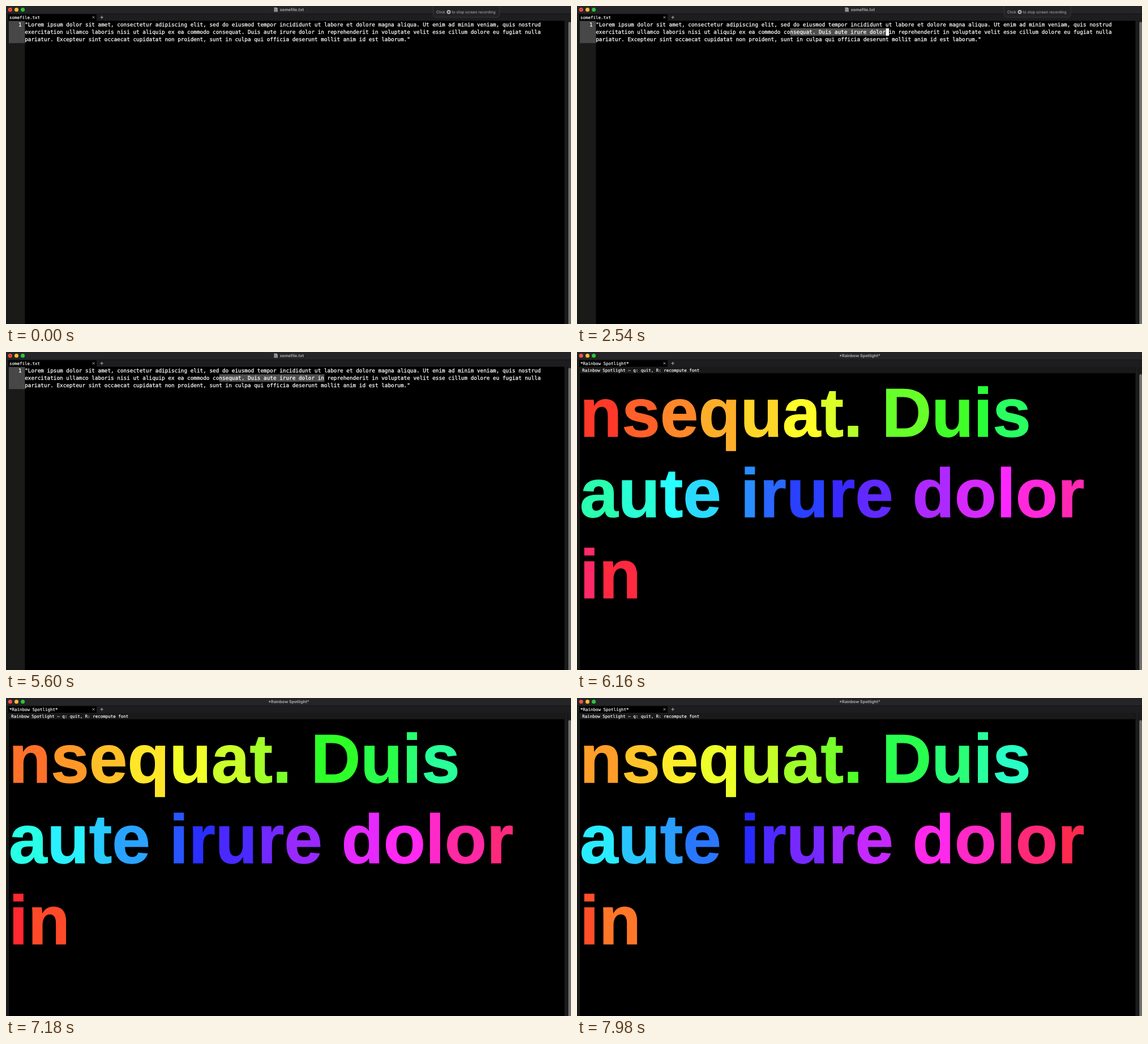
An HTML page for the animation above (8000 ms loop, 998 px wide and 561 px high).

```html
<!DOCTYPE html>
<html lang="en">
<head>
<meta charset="utf-8">
<title>Editor</title>
<style>
  html, body { margin: 0; width: 100%; height: 100%; overflow: hidden; background: #000; }
  svg { display: block; width: 100%; height: 100%; }
  text { text-rendering: geometricPrecision; white-space: pre; font-kerning: none; font-variant-ligatures: none; }
  .mono { font-family: "DejaVu Sans Mono", monospace; font-size: 9.35px; fill: #fff; stroke: #fff; stroke-width: .25px; }
  .small { font-size: 7.48px; stroke-width: .15px; }
  .title { font: 700 7.2px Inter, sans-serif; fill: #a9a9ab; text-anchor: middle; }
  .hint { font: 500 6.6px Inter, sans-serif; fill: #a2a2a4; }
  .big { font: 700 121.5px "Liberation Sans", Arial, sans-serif; stroke-width: 1.3px; }
</style>
</head>
<body>
<svg viewBox="0 0 998 561" preserveAspectRatio="none">
  <rect width="998" height="561"/>
  <rect width="998" height="14" fill="#252527"/>
  <rect y="14" width="998" height="12" fill="#1d1d20"/>
  <rect y="13.4" width="998" height="1" fill="#131315"/>
  <rect x="4" y="14.5" width="156" height="11.5"/>
  <rect y="26" width="5" height="535" fill="#19191a"/>
  <rect x="986.5" y="26" width="11.5" height="535" fill="#1c1c1d"/>
  <rect x="992" y="26" width="1" height="535" fill="#0f0f10"/>
  <rect id="thumb" x="993.2" width="4.8" height="560" rx="2.4" fill="#707071"/>
  <g id="lights">
    <circle cx="7.3" cy="6.6" r="3.5" fill="#fe4f48"/>
    <circle cx="18.5" cy="6.6" r="3.5" fill="#fdbd2f"/>
    <circle cx="29.6" cy="6.6" r="3.5" fill="#2ac73f"/>
  </g>
  <text id="title" class="title" y="9"></text>
  <text id="tab" class="mono small" x="6" y="22.7"></text>
  <path d="M152.7 18.2l3.6 3.6m0-3.6l-3.6 3.6M166.6 20h5.2M169.2 17.4v5.2" stroke="#c4c4c4" stroke-width=".9"/>

  <g id="editor">
    <circle cx="7.3" cy="6.6" r="1.1" fill="#7c1410"/>
    <path d="M473.4 2.4h4l2.6 2.6v5.2h-6.6z" fill="#8f8f91"/>
    <path d="M477.4 2.4v2.6h2.6z" fill="#c2c2c4"/>
    <rect x="5" y="26" width="28.4" height="535" fill="#1a1a19"/>
    <rect x="5" y="26.5" width="28.4" height="39" fill="#474747"/>
    <text class="mono" x="22" y="36.4">1</text>
    <rect id="selection" y="39.4" height="13" fill="#4e4e4e"/>
    <g id="lines"></g>
    <g id="cursor">
      <rect y="39.4" width="5.63" height="13" fill="#fff"/>
      <text id="under" class="mono" y="49.4" style="fill:#000;stroke:none"></text>
    </g>
    <g id="hint">
      <rect x="754.5" y="-6" width="117.5" height="26" rx="5" fill="#232325" stroke="#3c3c3e" stroke-width=".8"/>
      <text class="hint" x="760" y="13">Click</text>
      <circle cx="782" cy="10.6" r="3.5" fill="#b4b4b6"/>
      <circle cx="782" cy="10.6" r="1.4" fill="#29292b"/>
      <text class="hint" x="787.5" y="13">to stop screen recording</text>
    </g>
  </g>

  <g id="rainbow">
    <rect x="5" y="26" width="981.5" height="11.5" fill="#19191a"/>
    <text class="mono small" x="9.3" y="34.5">Rainbow Spotlight – q: quit, R: recompute font</text>
    <g id="words"></g>
  </g>
</svg>
<script>
const LOOP = 8000, COL = 5.63, LEFT = 33.2, MARK = 61;
const RAINBOW_AT = 5640;
const paragraph = [
  '"Lorem ipsum dolor sit amet, consectetur adipiscing elit, sed do eiusmod tempor incididunt ut labore et dolore magna aliqua. Ut enim ad minim veniam, quis nostrud',
  'exercitation ullamco laboris nisi ut aliquip ex ea commodo consequat. Duis aute irure dolor in reprehenderit in voluptate velit esse cillum dolore eu fugiat nulla',
  'pariatur. Excepteur sint occaecat cupidatat non proident, sunt in culpa qui officia deserunt mollit anim id est laborum."'
];
const spotlight = ['nsequat. Duis ', 'aute irure dolor ', 'in'];

// [time, cursor column, cursor visible]
const moves = [
  [0, MARK, false], [440, MARK, true], [860, 68, true], [1260, 74, true],
  [1680, 79, true], [2080, 85, true], [2400, 91, true], [2800, 94, true], [5600, 94, false]
];
// [time, scale, opacity]
const hintSteps = [[0, 1, 1], [3620, .8, .8], [3660, .57, .6], [3760, .5, 0]];

const $ = id => document.getElementById(id);
const at = (steps, t) => steps.findLast(s => s[0] <= t);
const show = (node, on) => node.setAttribute('visibility', on ? 'inherit' : 'hidden');

function addNode(parent, tag, attrs, content) {
  const node = document.createElementNS('http://www.w3.org/2000/svg', tag);
  for (const key in attrs) node.setAttribute(key, attrs[key]);
  if (content) node.textContent = content;
  return parent.appendChild(node);
}

paragraph.forEach((line, i) =>
  addNode($('lines'), 'text', { class: 'mono', x: LEFT, y: 36.4 + 13 * i }, line));

const letters = spotlight.flatMap((line, i) => {
  const row = addNode($('words'), 'text', { class: 'big', x: 5, y: 149.1 + 142.3 * i });
  return [...line].map(char => addNode(row, 'tspan', {}, char));
});

function drawEditor(t) {
  const [, col, visible] = at(moves, t);
  const x = LEFT + COL * col;
  $('selection').setAttribute('x', LEFT + COL * MARK);
  $('selection').setAttribute('width', COL * (col - MARK));
  show($('cursor'), visible);
  $('cursor').setAttribute('transform', `translate(${x} 0)`);
  $('under').textContent = paragraph[1][col];

  const [, scale, opacity] = at(hintSteps, t);
  $('hint').setAttribute('transform', `translate(755.6 -5) scale(${scale}) translate(-755.6 5)`);
  $('hint').setAttribute('opacity', opacity);
}

function drawRainbow(t) {
  const shift = 4.5 + (t - 6160) * .0154;
  letters.forEach((letter, i) => {
    const hue = (shift + 360 * i / letters.length + 360) % 360;
    const color = `hsl(${hue.toFixed(1)}, 100%, 58%)`;
    letter.setAttribute('fill', color);
    letter.setAttribute('stroke', color);
  });
}

function draw(now) {
  const t = now % LOOP, rainbow = t >= RAINBOW_AT;
  const name = rainbow ? '*Rainbow Spotlight*' : 'somefile.txt';
  show($('editor'), !rainbow);
  show($('rainbow'), rainbow);
  $('title').setAttribute('x', rainbow ? 499.5 : 505);
  $('title').textContent = name;
  $('tab').textContent = name;
  $('thumb').setAttribute('y', rainbow ? 39 : 28);
  if (rainbow) drawRainbow(t); else drawEditor(t);
}

const start = performance.now();
function tick() {
  draw(performance.now() - start);
  requestAnimationFrame(tick);
}
tick();
</script>
</body>
</html>
```
